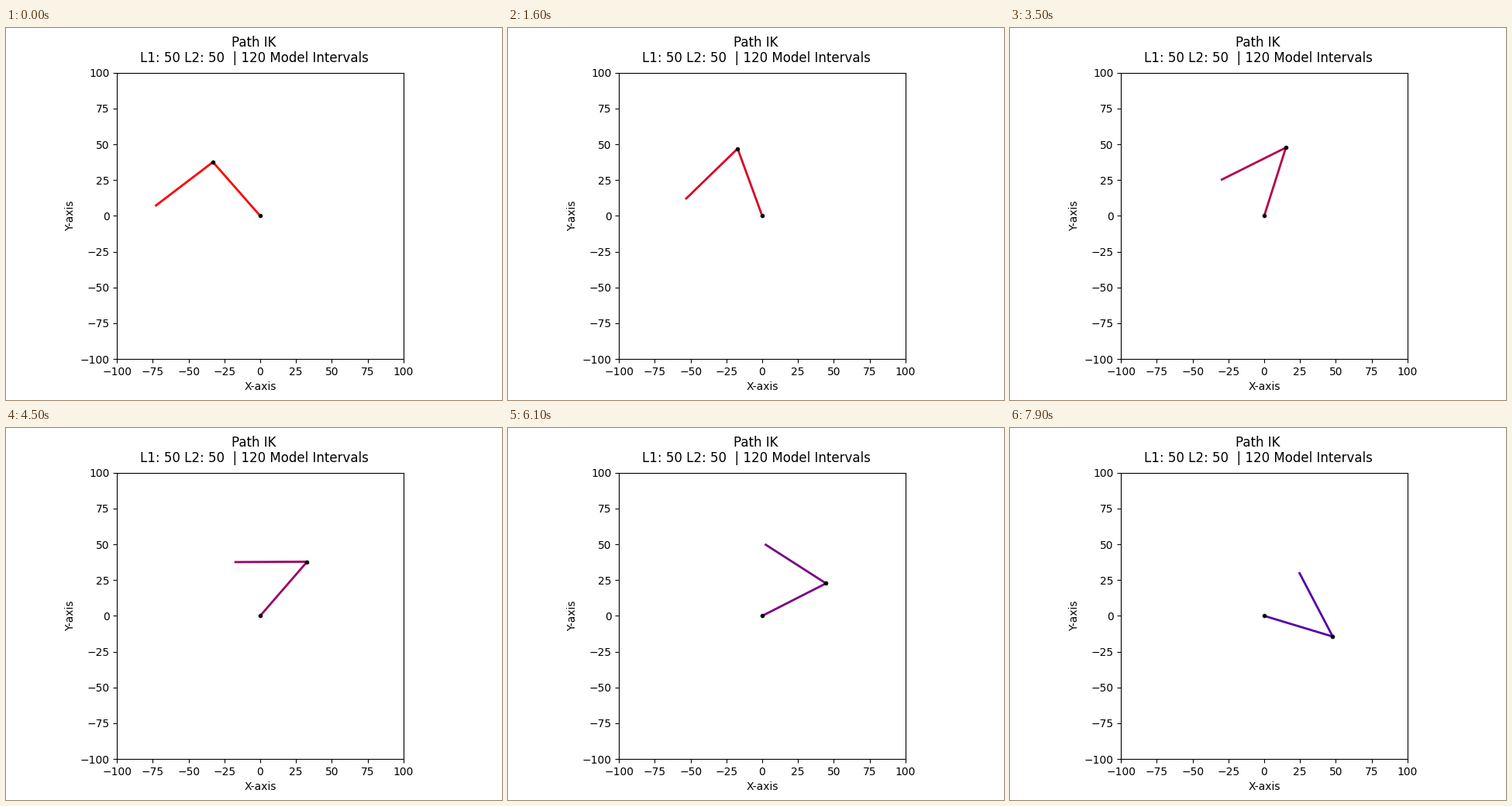
Animation, 640 px wide and 480 px high, one loop 8 s. Source, as a matplotlib script:

```python
import numpy as np
import matplotlib.pyplot as plt
from matplotlib.animation import FuncAnimation

L1 = L2 = 50
STEPS = 120      # intervals along the whole path
FRAMES = 80
REACH = 74       # path spans -REACH..REACH
PEAK, WIDTH = 50, 30


def path_point(u):
    """Point on the bell-shaped path for u in 0..1."""
    x = REACH * (2 * u - 1)
    return x, PEAK / (1 + (x / WIDTH) ** 2)


def elbow_point(x, y):
    """Two-link inverse kinematics, elbow on the clockwise side."""
    r = np.hypot(x, y)
    bend = np.arccos((r * r + L1 ** 2 - L2 ** 2) / (2 * L1 * r))
    angle = np.arctan2(y, x) - bend
    return L1 * np.cos(angle), L1 * np.sin(angle)


fig, ax = plt.subplots(figsize=(6.4, 4.8), dpi=100)
fig.suptitle(f"Path IK\nL1: {L1} L2: {L2}  | {STEPS} Model Intervals")
ax.set(xlim=(-100, 100), ylim=(-100, 100), aspect="equal",
       xlabel="X-axis", ylabel="Y-axis")

arm, = ax.plot([], [], lw=2)
joints, = ax.plot([], [], "k.", ms=6)


def update(k):
    u = (k + 1) / STEPS
    tip = path_point(u)
    elbow = elbow_point(*tip)
    arm.set_data(*zip((0, 0), elbow, tip))
    arm.set_color((1 - u, 0, u))
    joints.set_data(*zip((0, 0), elbow))
    return arm, joints


anim = FuncAnimation(fig, update, frames=FRAMES, interval=100,
                     init_func=lambda: update(0), repeat=True, repeat_delay=0)
plt.show()
```
